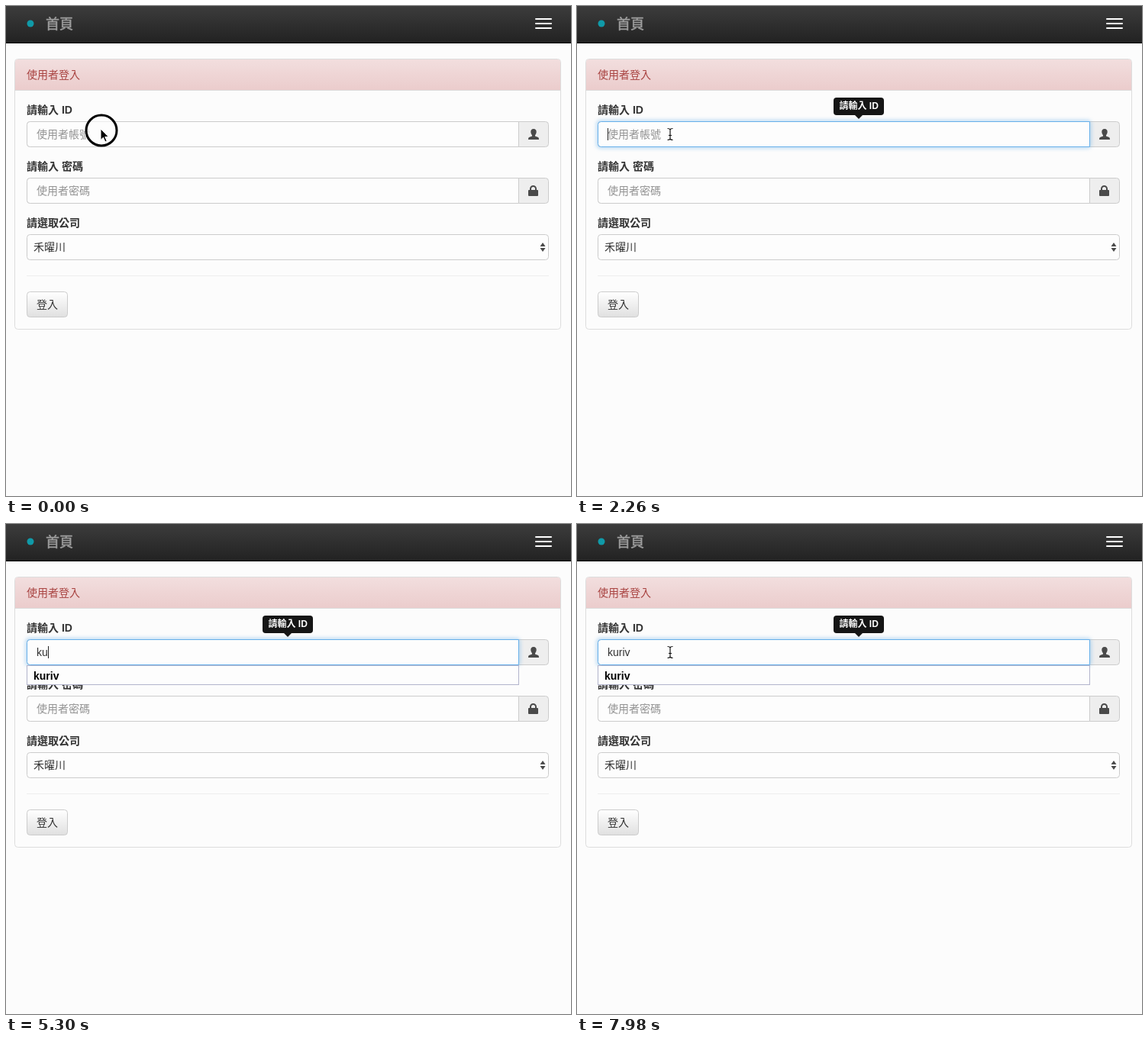
These frames come from a looping animation (740 by 642 pixels, 8000 ms). An HTML page:

```html
<!DOCTYPE html>
<html lang="zh-Hant">
<head>
<meta charset="utf-8">
<title>使用者登入</title>
<style>
  html, body { margin: 0; width: 100%; height: 100%; overflow: hidden; background: #fcfcfc; }
  svg { display: block; }
  text { font: 14px "Liberation Sans", "Noto Sans CJK TC", "Noto Sans CJK JP", "Noto Sans CJK", sans-serif; fill: #333; }
  .bold { font-weight: 700; }
  .hint { fill: #939393; }
  .field { fill: #fdfdfd; stroke: #ccc; }
  .addon { fill: #eee; stroke: #ccc; }
  .icon { fill: #4a4a4a; }
</style>
</head>
<body>
<svg width="740" height="642" viewBox="0 0 740 642">
  <defs>
    <linearGradient id="nav" x2="0" y2="1"><stop stop-color="#3c3c3c"/><stop offset="1" stop-color="#222"/></linearGradient>
    <linearGradient id="heading" x2="0" y2="1"><stop stop-color="#f2dede"/><stop offset="1" stop-color="#ebcccc"/></linearGradient>
    <linearGradient id="button" x2="0" y2="1"><stop stop-color="#fff"/><stop offset="1" stop-color="#e0e0e0"/></linearGradient>
    <filter id="glow" x="-5%" y="-50%" width="110%" height="200%"><feGaussianBlur stdDeviation="2.5"/></filter>
    <path id="beamShape" d="M-3.500-7.500q3 0 3.500 1.500q.5-1.500 3.500-1.500M0-6V6M-3.500 7.500q3 0 3.500-1.500q.5 1.500 3.500 1.500M-2 1.500h4"/>
  </defs>

  <rect width="740" height="642" fill="#fcfcfc"/>
  <rect width="740" height="48" fill="url(#nav)"/>
  <rect y="48" width="740" height="1" fill="#080808"/>
  <circle cx="32" cy="23" r="4.500" fill="#109aa8"/>
  <text id="brand" x="52" y="29.500" stroke-width=".5" style="font-size:18px">首頁</text>
  <path d="M694 17h20M694 23h20M694 29h20" stroke="#fff" stroke-width="2" stroke-linecap="round"/>

  <rect x="11.500" y="69.500" width="715" height="354" rx="4" fill="#fcfcfc" stroke="#ddd"/>
  <path d="M12 110V73.500a3.500 3.500 0 0 1 3.500-3.500H722.500a3.500 3.500 0 0 1 3.500 3.500V110z" fill="url(#heading)"/>
  <path d="M12 110.500H726" stroke="#ddd"/>
  <text x="27" y="95" style="fill:#a94442">使用者登入</text>

  <text class="bold" x="27" y="141">請輸入 ID</text>
  <text class="bold" x="27" y="215">請輸入 密碼</text>
  <text class="bold" x="27" y="289">請選取公司</text>

  <g id="inputs"></g>
  <path class="icon" d="M691 161c2.600 0 3.900 1.900 3.700 4.300c-.2 1.900-.9 3.100-1.700 3.900v1.200l4 1.700q1 .5 1 2.900H684q0-2.400 1-2.900l4-1.700v-1.200c-.8-.8-1.500-2-1.700-3.900c-.2-2.400 1.100-4.300 3.700-4.300z"/>
  <rect class="icon" x="684" y="241" width="13" height="8" rx="1"/>
  <path d="M687 241.500v-2a3.500 3.500 0 0 1 7 0v2" fill="none" stroke="#4a4a4a" stroke-width="2"/>
  <text class="hint" x="40" y="247">使用者密碼</text>

  <rect class="field" x="27.500" y="299.500" width="683" height="33" rx="4"/>
  <text x="36" y="321">禾曜川</text>
  <path class="icon" d="M699.500 315l3.500-5l3.500 5zM699.500 317l3.500 5l3.500-5z"/>
  <path d="M27 353.500H711" stroke="#eee"/>
  <rect x="27.500" y="374.500" width="53" height="33" rx="4" fill="url(#button)" stroke="#ccc"/>
  <text x="40" y="396">登入</text>

  <g id="focus">
    <rect x="27.500" y="151.500" width="644" height="33" rx="3" fill="none" stroke="#66afe9" stroke-width="4" opacity=".5" filter="url(#glow)"/>
    <path d="M671.500 151.500H31.500a4 4 0 0 0-4 4V180.500a4 4 0 0 0 4 4H671.500z" fill="#fdfdfd" stroke="#66afe9"/>
    <rect x="336" y="120" width="66" height="23" rx="4" fill="#151515"/>
    <path d="M364 143h10l-5 5z" fill="#151515"/>
    <text class="bold" x="343.500" y="135" style="font-size:12px;fill:#fff">請輸入 ID</text>
  </g>
  <text id="placeholder" class="hint" x="40" y="173">使用者帳號</text>
  <text id="typed" x="40" y="173"></text>
  <rect id="caret" y="160" width="1" height="16" fill="#222"/>
  <g id="suggestion">
    <rect x="27.500" y="185.500" width="644" height="25" fill="#fdfdfd" stroke="#b2b4cc"/>
    <text class="bold" x="36" y="204" style="fill:#000">kuriv</text>
  </g>

  <circle id="ring" cx="125" cy="163" r="20" fill="#fdfdfd" fill-opacity=".65" stroke="#000" stroke-width="3"/>
  <path id="arrow" d="M0 0V14.500l3.400-3.200l2.500 5.700l2.300-1l-2.500-5.500h4.600z" stroke="#fff"/>
  <g id="beam" fill="none">
    <use href="#beamShape" stroke="#fff" stroke-width="3"/>
    <use href="#beamShape" stroke="#111" stroke-width="1.200"/>
  </g>
</svg>
<script>
const el = id => document.getElementById(id);
const show = (id, on) => el(id).setAttribute('visibility', on ? 'visible' : 'hidden');

el('inputs').innerHTML = [151.5, 225.5].map(y => `
  <rect class="addon" x="27.5" y="${y}" width="683" height="33" rx="4"/>
  <path class="field" d="M671.5 ${y}H31.5a4 4 0 0 0-4 4v25a4 4 0 0 0 4 4H671.5z"/>`).join('');

const LOOP = 8000, FOCUS = 2040, NAME = 'kuriv';
const KEYS = [5100, 5270, 5600, 5850, 6050];
const POINTER_BACK = 7500;
// Pointer stops: time, x, y
const STOPS = [[0, 124, 161], [200, 124, 161], [520, 70, 24], [800, 70, 24],
               [1100, 124, 166], [1800, 124, 166], [1950, 122, 168], [LOOP, 122, 168]];

function pointerAt(t) {
  const i = STOPS.findIndex(stop => stop[0] > t);
  const [t0, x0, y0] = STOPS[i - 1], [t1, x1, y1] = STOPS[i];
  const p = (t - t0) / (t1 - t0), ease = p * p * (3 - 2 * p);
  return [x0 + (x1 - x0) * ease, y0 + (y1 - y0) * ease];
}

function draw(t) {
  const focused = t >= FOCUS;
  const count = KEYS.filter(key => key <= t).length;
  const [x, y] = pointerAt(t);
  const pointerVisible = !count || t >= POINTER_BACK;
  const overInput = t > 200 && y > 151;

  const brandColor = t >= 460 && !focused ? '#fff' : '#9d9d9d';
  el('brand').style.fill = el('brand').style.stroke = brandColor;
  el('focus').setAttribute('opacity', Math.min(1, Math.max(0, (t - FOCUS) / 150)));

  el('typed').textContent = NAME.slice(0, count);
  show('placeholder', !count);
  show('suggestion', count);
  const blinkStart = count ? KEYS[count - 1] : FOCUS;
  show('caret', focused && (t - blinkStart) % 1000 < 500);
  el('caret').setAttribute('x', 40 + (count ? Math.round(el('typed').getComputedTextLength()) : 0));

  show('ring', t < 200);
  show('arrow', pointerVisible && !overInput);
  show('beam', pointerVisible && overInput);
  for (const id of ['arrow', 'beam'])
    el(id).setAttribute('transform', `translate(${x.toFixed(1)} ${y.toFixed(1)})`);
}

const start = performance.now();
function tick() {
  draw((performance.now() - start) % LOOP);
  requestAnimationFrame(tick);
}
tick();
</script>
</body>
</html>
```
